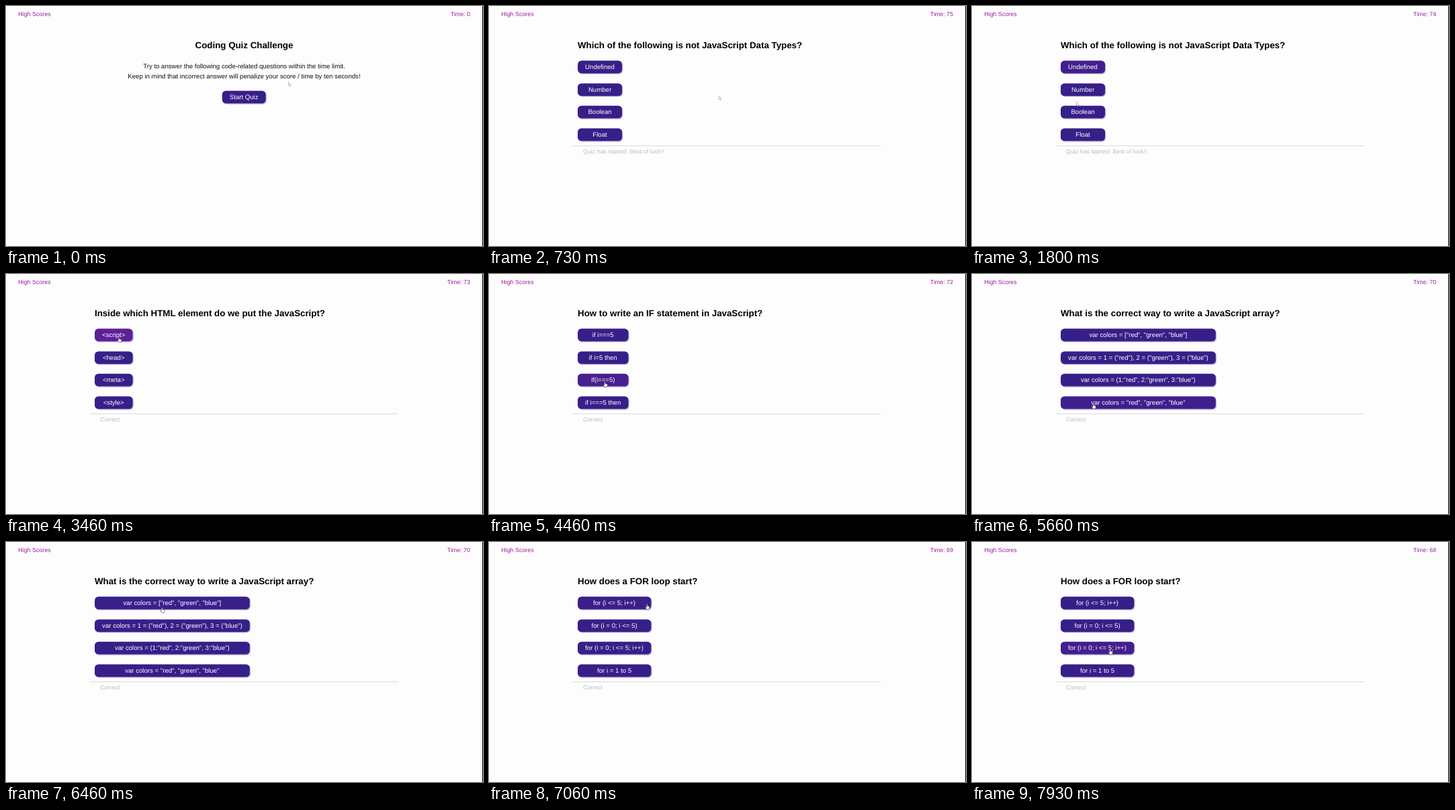
Recreate the animation shown at these times as an HTML page. Size 710 px wide and 358 px high, loop 8 s.

```html
<!DOCTYPE html>
<html lang="en">
<head>
<meta charset="utf-8">
<title>Coding quiz</title>
<style>
  html, body { margin: 0; width: 100%; height: 100%; overflow: hidden; background: #fdfdfd; }
  body { position: relative; }
  /* A 1280 px wide page shown at 710 px */
  #page {
    left: 0; top: 0; width: 1280px; height: 645px;
    transform: scale(.5547); transform-origin: 0 0;
    font-family: "Liberation Sans", Arial, sans-serif;
    text-rendering: geometricPrecision;
    white-space: nowrap;
  }
  #page, .bar, .screen, h1, p, .answers, .status, .edge, #cursor { position: absolute; margin: 0; }
  .bar { top: 12px; font-size: 16px; line-height: 22px; color: #96209b; }
  .screen { inset: 0; visibility: hidden; }
  h1 { left: 238px; top: 87.6px; font-size: 24px; line-height: 36px; color: #000; }
  p { left: 0; width: 1278px; top: 148px; font-size: 17.33px; line-height: 27.3px; text-align: center; color: #111; }
  .intro h1 { left: 0; width: 1278px; text-align: center; }
  .answers { left: 238px; top: 147px; display: inline-grid; row-gap: 26.6px; }
  .intro .answers { left: 580px; top: 228px; }
  .answer {
    padding: 0 20px; border-radius: 10px; text-align: center;
    font-size: 17.33px; line-height: 34px; color: #fff;
    box-shadow: 2px 2px 2px #b3aad3;
  }
  .status {
    left: 225.4px; top: 375px; width: 800px; padding: 5px 0 0 27px;
    border-top: 2px solid #dedede; font-size: 16px; line-height: 22px; color: #bcbcbc;
  }
  .edge { right: 0; top: 0; width: 1px; height: 100%; background: #000; }
  #cursor { left: 0; top: 0; overflow: visible; }
</style>
</head>
<body>
<div id="page">
  <div class="bar" style="left:33px">High Scores</div>
  <div class="bar" id="timer" style="right:34.3px"></div>
</div>
<div class="edge"></div>
<svg id="cursor" width="10" height="12" stroke-linejoin="round">
  <path id="arrow" d="M0 .3V6L1.3 4.9L2.2 6.9L3 6.5L2.3 4.6H4Z" fill="#fff" stroke="#999" stroke-width=".6"/>
  <path id="hand" d="M-.7 .6Q0 -.5 .7 .6V3L3.4 3.6Q4 3.8 3.9 4.6L3.3 8H-.4L-2.3 5.3Q-2.2 4.3 -1.3 4.8L-.7 5.3Z" fill="#fff" stroke="#222" stroke-width=".5"/>
</svg>
<script>
const LOOP = 8000, FADE = 350, STEP = 10;
const BASE = [55, 31, 137], HOVER = [94, 32, 153];

const screens = [
  { start: 0, title: "Coding Quiz Challenge", answers: ["Start Quiz"],
    intro: ["Try to answer the following code-related questions within the time limit.",
            "Keep in mind that incorrect answer will penalize your score / time by ten seconds!"] },
  { start: 560, title: "Which of the following is not JavaScript Data Types?",
    answers: ["Undefined", "Number", "Boolean", "Float"], status: "Quiz has started. Best of luck!!" },
  { start: 2500, title: "Inside which HTML element do we put the JavaScript?",
    answers: ["<script>", "<head>", "<meta>", "<style>"] },
  { start: 3560, title: "How to write an IF statement in JavaScript?",
    answers: ["if i===5", "if i=5 then", "if(i===5)", "if i===5 then"] },
  { start: 4700, title: "What is the correct way to write a JavaScript array?",
    answers: ['var colors = ["red", "green", "blue"]',
              'var colors = 1 = ("red"), 2 = ("green"), 3 = ("blue")',
              'var colors = (1:"red", 2:"green", 3:"blue")',
              'var colors = "red", "green", "blue"'] },
  { start: 7030, title: "How does a FOR loop start?",
    answers: ["for (i <= 5; i++)", "for (i = 0; i <= 5)", "for (i = 0; i <= 5; i++)", "for i = 1 to 5"] }
];

// Pointer stops: time, x, y
const path = [
  [0, 420.5, 112.8], [150, 420.5, 112.8], [500, 358, 137], [640, 358, 137],
  [1150, 168, 96], [1500, 166, 97], [1800, 155.5, 142.5], [2100, 163, 192],
  [2600, 163, 192], [3150, 168, 94], [3860, 168, 94], [4490, 172.5, 161],
  [5100, 172.5, 161], [5300, 178, 174], [5540, 178, 174], [5660, 180.5, 193],
  [5900, 180.5, 193], [6550, 235, 92.5], [7390, 235, 92.5], [7980, 205, 161], [LOOP, 205, 161]
];

const byId = id => document.getElementById(id);
const page = byId("page"), timer = byId("timer");
const cursor = byId("cursor"), arrow = byId("arrow"), hand = byId("hand");

function add(parent, tag, className, text = "") {
  const node = document.createElement(tag);
  node.className = className;
  node.textContent = text;
  return parent.appendChild(node);
}

for (const screen of screens) {
  screen.node = add(page, "div", screen.intro ? "screen intro" : "screen");
  add(screen.node, "h1", "", screen.title);
  if (screen.intro) add(screen.node, "p", "", screen.intro.join("\n")).style.whiteSpace = "pre";
  else add(screen.node, "div", "status", screen.status || "Correct");
  const list = add(screen.node, "div", "answers");
  screen.buttons = screen.answers.map(text => add(list, "div", "answer", text));
  screen.boxes = screen.buttons.map(button => button.getBoundingClientRect());
}

function pointerAt(t) {
  const i = Math.max(1, path.findIndex(stop => stop[0] > t));
  const [t0, x0, y0] = path[i - 1], [t1, x1, y1] = path[i];
  const u = (t - t0) / (t1 - t0), e = u * u * (3 - 2 * u);
  return [x0 + (x1 - x0) * e, y0 + (y1 - y0) * e];
}

function hit(boxes, [x, y]) {
  return boxes.findIndex(b => x >= b.left && x <= b.right && y >= b.top && y <= b.bottom);
}

// Replays the pointer since the screen opened, so colours depend on time alone
function hoverLevels({ start, boxes }, t) {
  const levels = boxes.map(() => 0);
  for (let s = start; s < t; s += STEP) {
    const over = hit(boxes, pointerAt(s));
    const change = Math.min(STEP, t - s) / FADE;
    levels.forEach((v, i) => levels[i] = Math.max(0, Math.min(1, v + (i === over ? change : -change))));
  }
  return levels;
}

function draw(t) {
  const current = screens.findLast(screen => screen.start <= t);
  for (const screen of screens) screen.node.style.visibility = screen === current ? "visible" : "hidden";

  hoverLevels(current, t).forEach((v, i) => {
    const rgb = BASE.map((c, k) => Math.round(c + (HOVER[k] - c) * v));
    current.buttons[i].style.background = `rgb(${rgb})`;
  });

  const seconds = 75 - Math.max(0, Math.floor((t - 560) / 1000));
  timer.textContent = "Time: " + (current.intro ? 0 : seconds);

  const point = pointerAt(t), over = hit(current.boxes, point) >= 0;
  cursor.style.transform = `translate(${point[0]}px, ${point[1]}px)`;
  arrow.style.display = over ? "none" : "";
  hand.style.display = over ? "" : "none";
}

const began = performance.now();
function tick() {
  draw((performance.now() - began) % LOOP);
  requestAnimationFrame(tick);
}
tick();
</script>
</body>
</html>
```
